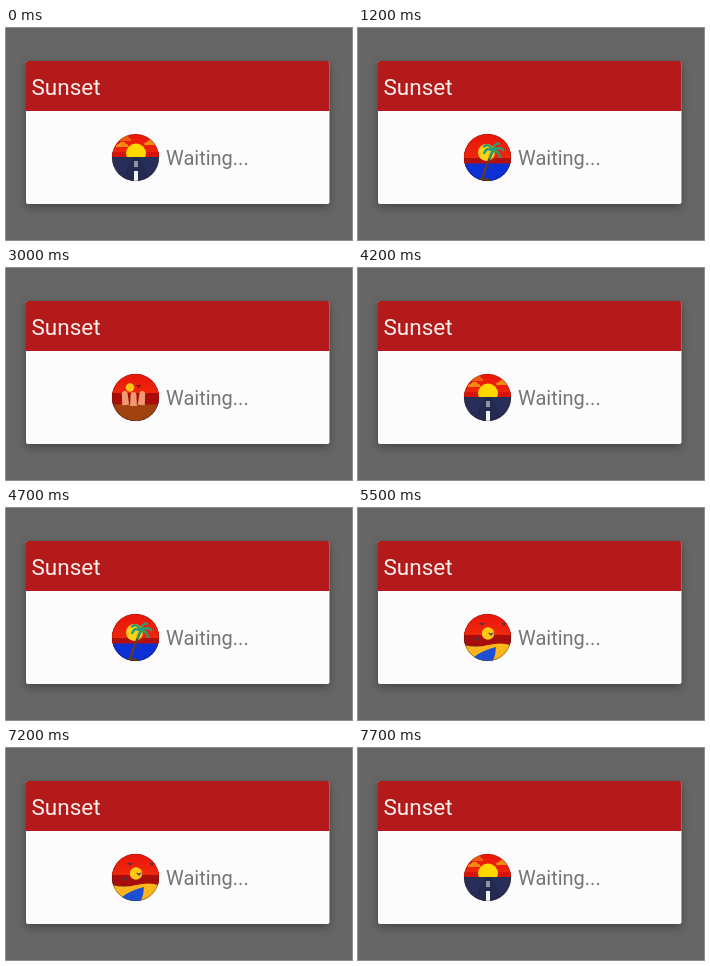
Animation of 346x212 px, one loop 8000 ms. Source, as an HTML page:

```html
<!DOCTYPE html>
<html lang="en">
<head>
<meta charset="utf-8">
<title>Sunset</title>
<style>
html, body { margin: 0; width: 100%; height: 100%; overflow: hidden; background: #666; }
svg { display: block; width: 346px; height: 212px; }
text { font-family: Roboto, sans-serif; }
.card { filter: drop-shadow(0 3px 4px rgba(0, 0, 0, .35)); }

/* The road lies underneath; the other scenes cover it for half a second each. */
.scene { visibility: hidden; animation: show 8s step-end infinite; }
.cliffs { animation-delay: .5s; }
.beach { animation-delay: 1s; }
@keyframes show {
  0%, 18.75%, 37.5%, 62.5%, 81.25%, 100% { visibility: hidden; }
  12.5%, 31.25%, 56.25%, 75% { visibility: visible; }
}
</style>
</head>
<body>
<svg viewBox="0 0 346 212">
  <defs>
    <clipPath id="disc"><circle cx="23.5" cy="23.5" r="23.6"/></clipPath>
    <linearGradient id="sky" x2="0" y2="1">
      <stop offset="0" stop-color="#e8150c"/>
      <stop offset="1" stop-color="#f02a0c"/>
    </linearGradient>
    <path id="bird" d="M-3-1Q-1-2 0 0Q1-2 3-1Q1 0 0 2Q-1 0-3-1Z"/>
    <path id="cloud" d="M-6 2Q-6-1-3-1Q-2-4 1-3Q3-4 4-1Q7-1 6 2Z"/>
    <path id="rock" d="M-3.5 14L-2.8 2Q-2.5 0 0 0Q2.5 0 2.8 2L3.5 14Z"/>
  </defs>

  <rect width="346" height="212" fill="#666"/>
  <g class="card">
    <rect x="20" y="33" width="303.5" height="143" rx="2" fill="#fcfcfc"/>
    <path d="M20 83V35a2 2 0 0 1 2-2H321.500a2 2 0 0 1 2 2V83Z" fill="#b51a1a"/>
  </g>
  <text x="25.500" y="67" font-size="22.5" fill="#fbeeee">Sunset</text>
  <text x="160" y="137" font-size="20" fill="#757575">Waiting...</text>

  <g transform="translate(106 106)">
    <g clip-path="url(#disc)">
      <g>
        <path d="M0 0H47V24H0Z" fill="url(#sky)"/>
        <path d="M0 18H47V24H0Z" fill="#d81408"/>
        <circle cx="24" cy="19.500" r="10" fill="#ffd800"/>
        <g fill="#f58a12">
          <use href="#cloud" x="10" y="11"/>
          <use href="#cloud" x="38" y="9"/>
          <use href="#cloud" x="13" y="5" opacity=".6"/>
        </g>
        <path d="M0 23H47V47H0Z" fill="#272e58"/>
        <path d="M21 23H27L39 47H9Z" fill="#222a50"/>
        <path d="M22 27H26V33H22Z" fill="#8f96ac"/>
        <path d="M22 37H26V47H22Z" fill="#f4f5fa"/>
      </g>

      <g class="scene">
        <path d="M0 0H47V30H0Z" fill="url(#sky)"/>
        <path d="M0 24H47V30H0Z" fill="#b3100c"/>
        <circle cx="22.500" cy="18.500" r="8.5" fill="#ffd21a"/>
        <path d="M0 29.500H47V47H0Z" fill="#0c30d4"/>
        <path d="M12 47Q20 41 28 47Z" fill="#6b3b16"/>
        <path d="M29 17Q23 28 18 46" fill="none" stroke="#6b3b16" stroke-width="2.2"/>
        <path d="M29 17Q22 12 20 20M29 17Q25 8 19 13M29 17Q30 8 36 10M29 17Q36 11 40 17M29 17Q36 17 36 24M29 17Q26 20 26 25"
          fill="none" stroke="#2b9d72" stroke-width="2.4"/>
      </g>

      <g class="scene cliffs">
        <path d="M0 0H47V22H0Z" fill="url(#sky)"/>
        <path d="M0 19H47V31H0Z" fill="#a80d0a"/>
        <circle cx="18" cy="13.500" r="4.2" fill="#ffc414"/>
        <use href="#bird" x="26.500" y="12" fill="#5a1712"/>
        <path d="M0 30.500H47V47H0Z" fill="#a0420e"/>
        <g fill="#ef9a72">
          <use href="#rock" transform="translate(12.500 17) rotate(-5)"/>
          <use href="#rock" transform="translate(21.500 18)"/>
          <use href="#rock" transform="translate(30.500 17) rotate(5)"/>
        </g>
      </g>

      <g class="scene beach">
        <path d="M0 0H47V22H0Z" fill="url(#sky)"/>
        <path d="M0 21H47V32H0Z" fill="#a60d0b"/>
        <circle cx="24" cy="19.500" r="6.2" fill="#ffc814"/>
        <path d="M0 31Q12 34 24 31T47 31V47H0Z" fill="#fcb51a"/>
        <path d="M32 33Q19 36 10 43V47H29Q32 40 32 33Z" fill="#1b50d6"/>
        <g fill="#3f3450">
          <use href="#bird" x="13" y="25"/>
          <use href="#bird" x="18" y="10"/>
          <use href="#bird" x="40" y="10"/>
          <use href="#bird" x="27" y="20"/>
        </g>
      </g>
    </g>
    <circle cx="23.500" cy="23.500" r="23.3" fill="none" stroke="#3a1a1a" stroke-opacity=".35" stroke-width=".7"/>
  </g>
</svg>
</body>
</html>
```
